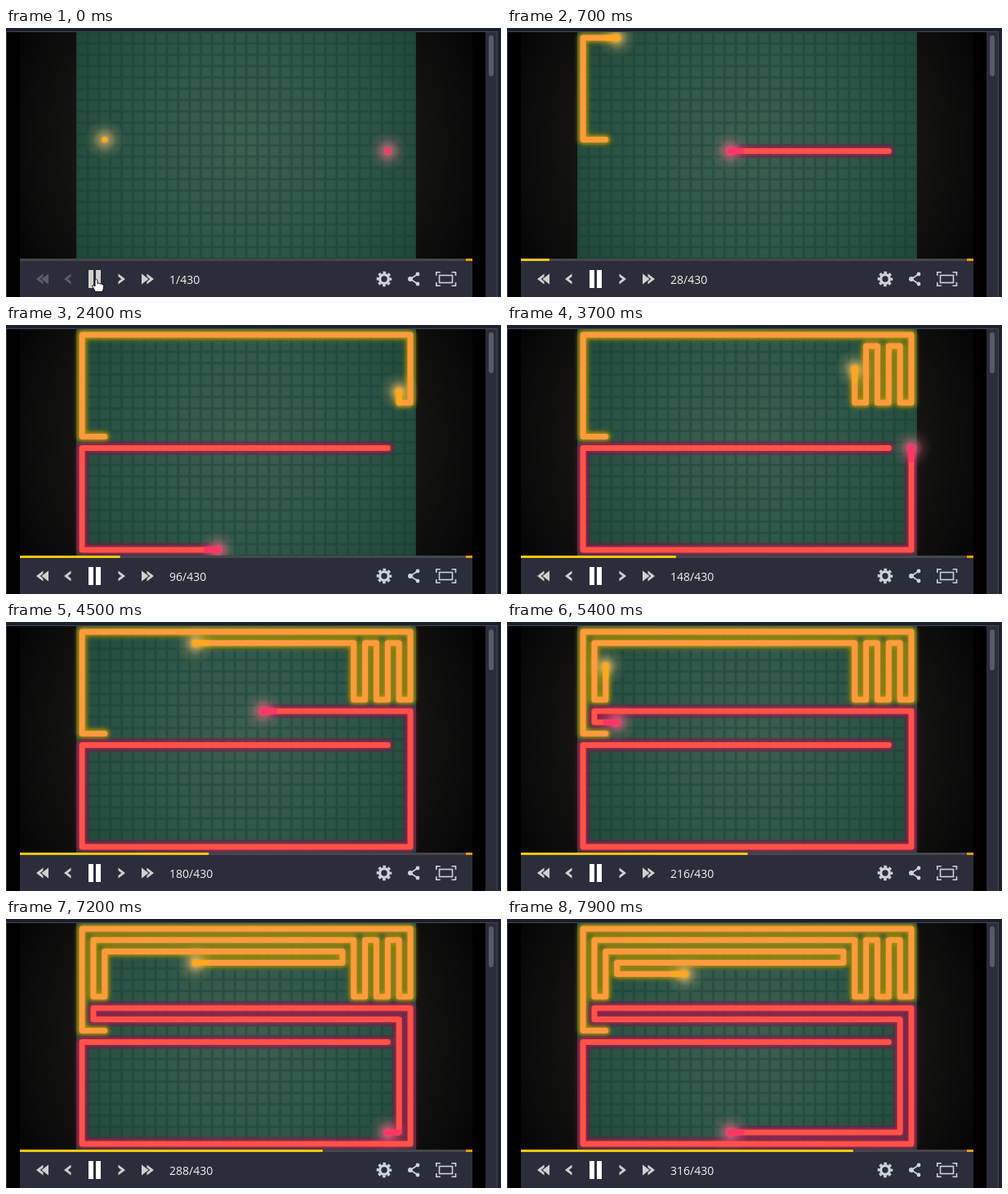
Recreate the animation shown at these times as an HTML page. Size 606 px wide and 329 px high, loop 8 s.

```html
<!DOCTYPE html>
<html lang="en">
<head>
<meta charset="utf-8">
<title>Light trails replay</title>
<style>
html, body { margin: 0; width: 100%; height: 100%; overflow: hidden; background: #000; }
svg { display: block; width: 606px; height: 329px; }
.trail, .halo, .tip { fill: none; stroke-linecap: round; stroke-linejoin: round; stroke-width: 7px; }
.halo { stroke-width: 12px; filter: url(#blur); }
.count { font: 14px "Open Sans", "Noto Sans", sans-serif; fill: #f2f2f2; }
</style>
</head>
<body>
<svg viewBox="0 0 606 329">
  <defs>
    <radialGradient id="room" gradientUnits="userSpaceOnUse" cx="294" cy="143" r="310">
      <stop offset="0.55" stop-color="#1b1a18"/>
      <stop offset="1" stop-color="#050505"/>
    </radialGradient>
    <radialGradient id="felt" gradientUnits="userSpaceOnUse" cx="294" cy="143" r="250">
      <stop offset="0" stop-color="#3c5f51"/>
      <stop offset="0.5" stop-color="#30584a"/>
      <stop offset="1" stop-color="#204739"/>
    </radialGradient>
    <pattern id="grid" patternUnits="userSpaceOnUse" x="86.1" y="5.1" width="13.86" height="13.84">
      <path d="M0 0H13.86M0 13.84H13.86M0 0V13.84M13.86 0V13.84" stroke="#0d3a2c" stroke-opacity="0.36" stroke-width="3"/>
    </pattern>
    <filter id="blur" filterUnits="userSpaceOnUse" x="0" y="-20" width="606" height="340">
      <feGaussianBlur stdDeviation="2.6"/>
    </filter>
    <clipPath id="screen"><rect x="17" y="5" width="554" height="277"/></clipPath>
    <path id="chev" d="M0 -6.5L8.5 0L0 6.5L0 3L3.8 0L0 -3Z"/>
    <g id="skip"><use href="#chev"/><use href="#chev" x="6.5"/><path d="M0 -6.5L6 0L0 6.5Z"/></g>
  </defs>

  <rect width="606" height="329" fill="#000"/>
  <rect width="606" height="4" fill="#1c202c"/>
  <rect y="4" width="602" height="1" fill="#444753"/>
  <rect y="5" width="1" height="324" fill="#33363f"/>
  <rect x="587" y="5" width="14" height="324" fill="#2b2d39"/>
  <rect x="601" y="4" width="1" height="325" fill="#444753"/>
  <rect x="602" y="4" width="4" height="325" fill="#1c202c"/>
  <rect x="591" y="9" width="6" height="50" rx="3" fill="#585a65"/>

  <g clip-path="url(#screen)">
    <rect x="17" y="5" width="554" height="277" fill="url(#room)"/>
    <rect x="86" y="5" width="416" height="277" fill="url(#felt)"/>
    <rect x="86" y="5" width="416" height="277" fill="url(#grid)"/>
    <g id="bikes"></g>
  </g>

  <rect x="17" y="282" width="554" height="47" fill="#2b2d3a"/>
  <rect x="17" y="282" width="554" height="3" fill="#45464b"/>
  <rect id="bar" x="17" y="282" height="3" fill="#f2c70e"/>
  <rect x="563" y="282" width="8" height="3" fill="#f09a10"/>

  <g fill="#cfd0d0">
    <g id="back">
      <use href="#skip" transform="translate(52 307) scale(-1 1)"/>
      <use href="#chev" transform="translate(79.5 307) scale(-1 1)"/>
    </g>
    <use href="#chev" transform="translate(137.5 307)"/>
    <use href="#skip" transform="translate(166 307)"/>
    <path id="pause" d="M101 296h6v22h-6zM110 296h6v22h-6z"/>
  </g>
  <text id="count" class="count" x="200" y="313"></text>

  <g fill="none" stroke="#ced4da">
    <circle cx="463" cy="307" r="5.4" stroke-width="3.4"/>
    <circle cx="463" cy="307" r="8" stroke-width="2.6" stroke-dasharray="3.5 2.783" stroke-dashoffset="1.75"/>
    <path d="M504 301L495 307L504 313" stroke-width="1.6"/>
    <rect x="530.5" y="302.5" width="16" height="9" stroke-width="1.6"/>
    <path d="M526.8 303v-4.2h5M545.5 298.8h5v4.2M550.5 311v4.2h-5M531.8 315.2h-5v-4.2" stroke-width="1.6"/>
  </g>
  <g fill="#ced4da">
    <circle cx="495" cy="307" r="3"/><circle cx="504" cy="301" r="2.4"/><circle cx="504" cy="313" r="2.4"/>
  </g>

  <path id="hand" d="M109.5 322.500L106 316.500Q105 314.500 107 314.500L109 316V308.500Q110.500 306 112 308.500V312.500Q113.500 311 115 313Q116.500 312 117.500 313.700Q119.500 313 119.500 315.500V318L118 322.500Z" fill="#fff" stroke="#111"/>
</svg>

<script>
const LOOP = 8000, STEP = 100, TOTAL = 430;
const NS = "http://www.w3.org/2000/svg";
const DIRS = { L: [-1, 0], R: [1, 0], U: [0, -1], D: [0, 1] };
const $ = id => document.getElementById(id);

const riders = [
  { start: [2, 9], trail: "#ff9b3d", tip: "#ffa722", halo: "#c09a08", glow: "#ffc878",
    route: "L2 U9 R29 D6 L1 U5 L1 D5 L1 U5 L1 D5 L1 U5 L23 D5 R1 U4 R21 D1 L20 D1 R6" },
  { start: [27, 10], trail: "#ff5148", tip: "#ff3565", halo: "#b80c52", glow: "#ff7890",
    route: "L27 D9 R29 U12 L28 D1 R25 R2 D10 L15" }
];

function add(parent, tag, attrs) {
  const el = document.createElementNS(NS, tag);
  for (const k in attrs) el.setAttribute(k, attrs[k]);
  return parent.appendChild(el);
}

// One grid cell per move.
function walk([x, y], route) {
  const cells = [[x, y]];
  for (const leg of route.split(" ")) {
    const [dx, dy] = DIRS[leg[0]];
    for (let i = +leg.slice(1); i > 0; i--) cells.push([x += dx, y += dy]);
  }
  return cells.map(([cx, cy]) => [93.1 + cx * 13.86, 12 + cy * 13.84]);
}

const toPath = pts => "M" + pts.map(p => p.map(v => v.toFixed(2)).join(" ")).join("L");

riders.forEach((r, i) => {
  r.cells = walk(r.start, r.route);
  const grad = add(document.querySelector("defs"), "radialGradient", { id: "glow" + i });
  [[0, 0.75], [0.3, 0.42], [0.6, 0.13], [1, 0]].forEach(([offset, o]) =>
    add(grad, "stop", { offset, "stop-color": r.glow, "stop-opacity": o }));
  const g = add($("bikes"), "g", {});
  r.haloEl = add(g, "path", { class: "halo", stroke: r.halo, "stroke-opacity": 0.85 });
  r.glowEl = add(g, "circle", { r: 25, fill: `url(#glow${i})` });
  r.trailEl = add(g, "path", { class: "trail", stroke: r.trail });
  r.tipEl = add(g, "path", { class: "tip", stroke: r.tip });
  r.dotEl = add(g, "circle", { r: 3.8, fill: r.tip });
});

function drawRider(r, moves) {
  const pts = r.cells.slice(0, moves + 1);
  const [x, y] = pts[pts.length - 1];
  const d = moves ? toPath(pts) : "";
  r.haloEl.setAttribute("d", d);
  r.trailEl.setAttribute("d", d);
  r.tipEl.setAttribute("d", moves ? toPath(pts.slice(-2)) : "");
  for (const c of [r.glowEl, r.dotEl]) {
    c.setAttribute("cx", x);
    c.setAttribute("cy", y);
  }
}

let last = -1;
function draw(time) {
  const step = Math.floor((time % LOOP) / STEP);
  if (step !== last) {
    last = step;
    const n = Math.max(1, step * 4), idle = step === 0;
    riders.forEach(r => drawRider(r, step * 2));
    $("bar").setAttribute("width", (n - 1) / (TOTAL - 1) * 554);
    $("count").textContent = n + "/" + TOTAL;
    $("back").setAttribute("opacity", idle ? 0.3 : 1);
    $("pause").setAttribute("fill", idle ? "#d2d2cc" : "#fff");
    $("hand").setAttribute("visibility", idle ? "visible" : "hidden");
  }
}

const t0 = performance.now();
function tick() {
  draw(performance.now() - t0);
  requestAnimationFrame(tick);
}
tick();
</script>
</body>
</html>
```
